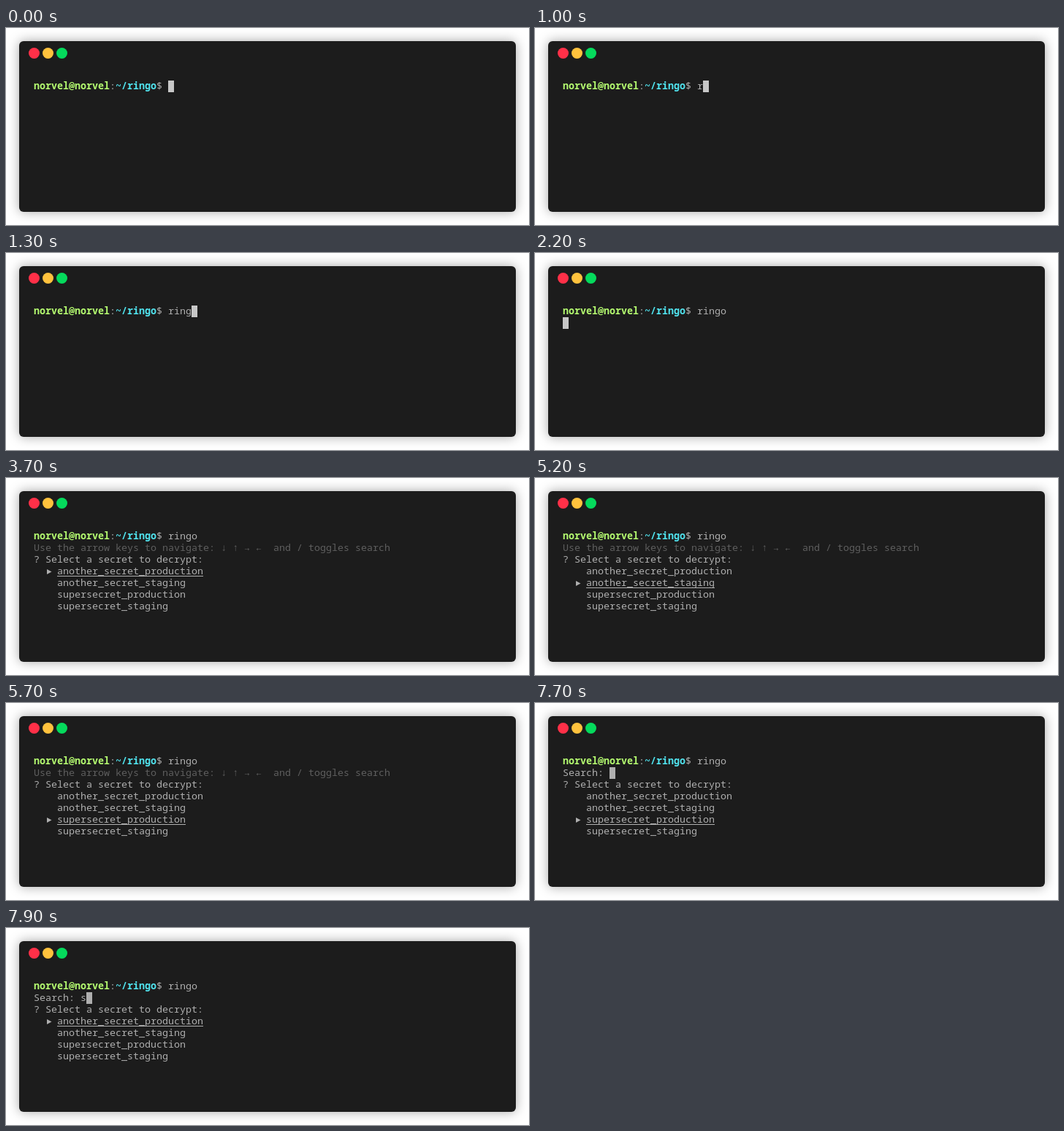
Write an HTML page that moves like this. It is 716 px wide and 270 px high and loops after 8000 ms.

```html
<!DOCTYPE html>
<html lang="en">
<head>
<meta charset="utf-8">
<title>Terminal</title>
<style>
  html, body { margin: 0; width: 100%; height: 100%; overflow: hidden; background: #fff; }
  svg { display: block; }
  text {
    font: 13.333px "Noto Sans Mono", "DejaVu Sans Mono", monospace;
    white-space: pre;
  }
  .bold { font-weight: 700; }
</style>
</head>
<body>
<svg width="716" height="270" viewBox="0 0 716 270">
  <defs>
    <filter id="shadow" x="-5%" y="-15%" width="110%" height="130%">
      <feDropShadow dx="0" dy="0" stdDeviation="8" flood-color="#000" flood-opacity=".35"/>
    </filter>
  </defs>
  <rect x="18" y="18" width="680" height="234" rx="6" fill="#1e1e1e" filter="url(#shadow)"/>
  <circle cx="38.5" cy="34.5" r="7.5" fill="#ff3048"/>
  <circle cx="57.5" cy="34.5" r="7.5" fill="#ffc23d"/>
  <circle cx="76.5" cy="34.5" r="7.5" fill="#05da5c"/>
  <g id="screen"></g>
</svg>
<script>
const LOOP = 8000, CELL = 8, ROW = 16, LEFT = 38, TOP = 72;
const FG = '#afafaf', DIM = '#5e5e5e', CURSOR = '#c7c7c7';
const USER = 'norvel', COMMAND = 'ringo';
const ITEMS = ['another_secret_production', 'another_secret_staging',
               'supersecret_production', 'supersecret_staging'];
const screen = document.getElementById('screen');

const colX = col => LEFT + col * CELL;
const rowY = row => TOP + row * ROW;

const text = (col, row, string, fill = FG, cls = '') =>
  `<text x="${colX(col)}" y="${rowY(row) + 12}" fill="${fill}" class="${cls}">${string}</text>`;

const block = (col, row, fill) =>
  `<rect x="${colX(col)}" y="${rowY(row)}" width="${CELL}" height="${ROW}" fill="${fill}"/>`;

const prompt = () =>
  text(0, 0, `${USER}@${USER}`, '#b4fb70', 'bold') + text(13, 0, ':') +
  text(14, 0, '~/ringo', '#50e3ee', 'bold') + text(21, 0, '$');

const hint = () =>
  text(0, 1, 'Use the arrow keys to navigate:', DIM) +
  [...'↓↑→←'].map((arrow, i) => text(32 + 2 * i, 1, arrow, DIM)).join('') +
  text(41, 1, 'and / toggles search', DIM);

const search = query =>
  text(0, 1, 'Search: ' + query) + block(8 + query.length, 1, FG);

const pointer = row =>
  `<path d="M56 ${rowY(row) + 5}l6.5 3.5-6.5 3.5z" fill="${FG}"/>` ;

const underline = (col, row, length) =>
  `<rect x="${colX(col)}" y="${rowY(row) + 14}" width="${length * CELL}" height="1" fill="${FG}"/>`;

function menu(selected) {
  const items = ITEMS.map((item, i) => text(4, 3 + i, item)).join('');
  const row = 3 + selected;
  return text(0, 2, '? Select a secret to decrypt:') + items +
    pointer(row) + underline(4, row, ITEMS[selected].length);
}

function selectedAt(t) {
  if (t < 5200 || t >= 7900) return 0;
  return t < 5700 ? 1 : 2;
}

function frameAt(t) {
  const count = Math.max(0, Math.min(COMMAND.length, Math.floor((t - 900) / 100)));
  let out = prompt() + text(23, 0, COMMAND.slice(0, count));
  if (t < 2200) return out + block(23 + count, 0, CURSOR);
  if (t < 3700) return out + block(0, 1, CURSOR);
  out += t < 7700 ? hint() : search(t < 7900 ? '' : 's');
  return out + menu(selectedAt(t));
}

let shown = '';
const start = performance.now();
function draw() {
  const next = frameAt((performance.now() - start) % LOOP);
  if (next !== shown) screen.innerHTML = shown = next;
  requestAnimationFrame(draw);
}
draw();
</script>
</body>
</html>
```
